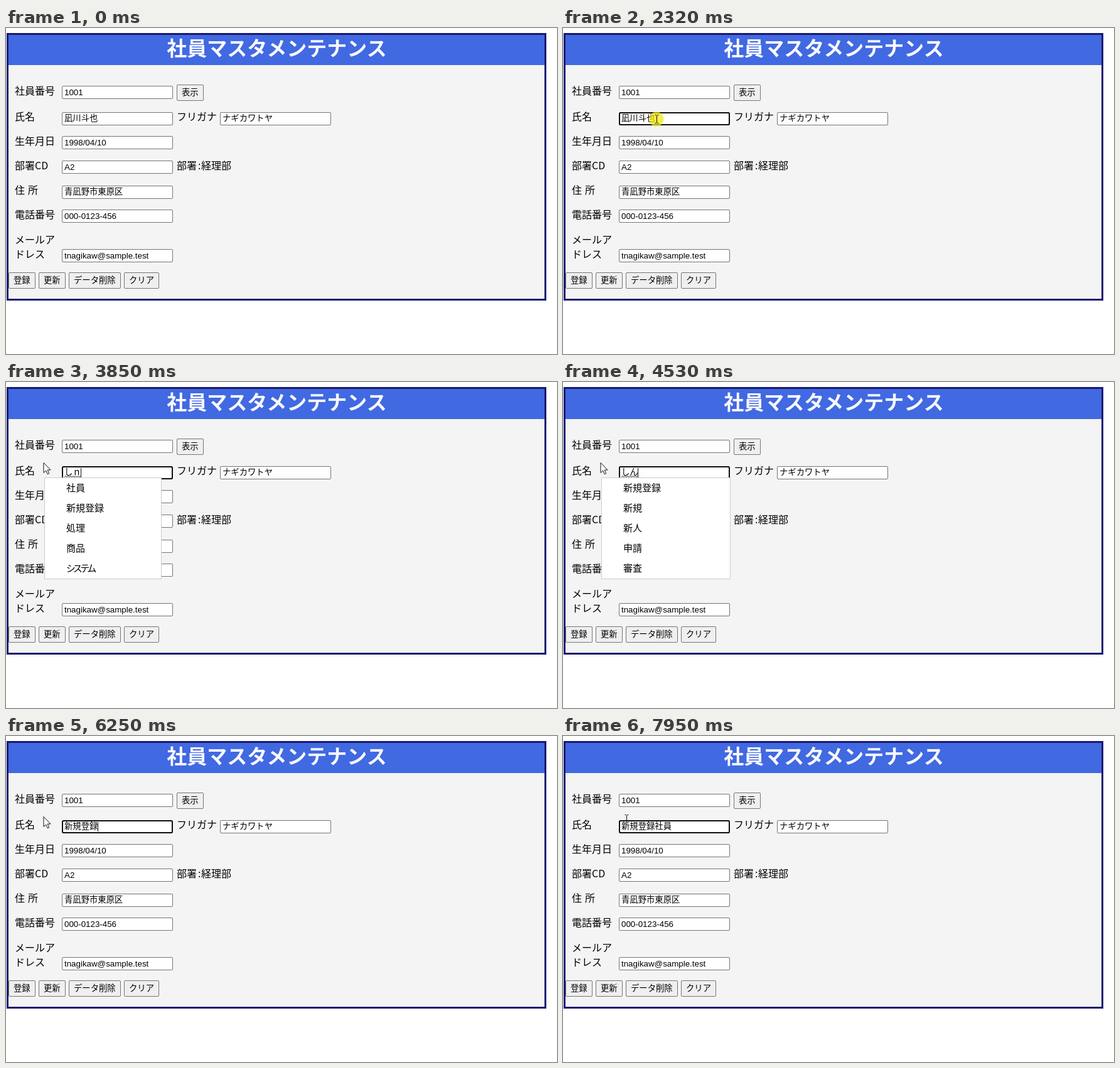
Write an HTML page that moves like this. It is 878 by 519 pixels and loops after 8 s.

```html
<!DOCTYPE html>
<html lang="ja">
<head>
<meta charset="utf-8">
<style>
html, body { margin: 0; width: 100%; height: 100%; overflow: hidden; background: #fff; }
svg { display: block; }
text { font: 16px 'Noto Sans CJK JP', 'Noto Sans CJK', sans-serif; word-spacing: 1.4px; }
.title { font-size: 32px; font-weight: 700; fill: #f8f8ff; text-anchor: middle; }
.field { font: 13.333px 'Liberation Sans', 'Noto Sans CJK JP', 'Noto Sans CJK', sans-serif; }
.button { font-size: 13.333px; }
.candidate { font-size: 15px; }
.kana { font-feature-settings: 'palt'; letter-spacing: -2.3px; }
.index { font: 13px 'Noto Sans', sans-serif; }
</style>
</head>
<body>
<svg id="stage" width="878" height="519" viewBox="0 0 878 519">
  <g id="form"></g>
  <g id="entry"></g>
  <g id="popup"></g>
  <g id="pointer"></g>
</svg>
<script>
const LOOP = 8000, CHAR = 13.333, TEXT_X = 93;
const NAME = '凪川斗也';
const $ = id => document.getElementById(id);

const rect = (x, y, w, h, fill, extra = '') =>
  `<rect x="${x}" y="${y}" width="${w}" height="${h}" fill="${fill}" ${extra}/>`;
const text = (x, y, str, cls = '', fill = '#000') =>
  `<text x="${x}" y="${y}" class="${cls}" ${cls === 'title' ? '' : `fill="${fill}"`}>${str}</text>`;
const line = (d, width = 1, extra = '') =>
  `<path d="${d}" fill="none" stroke="#111" stroke-width="${width}" ${extra}/>`;

// x, top, value, baseline offset
const fields = [
  [89, 92, '1001', 15], [89, 134, '', 14], [341, 134, 'ナギカワトヤ', 14],
  [89, 172, '1998/04/10', 15], [89, 211, 'A2', 15], [89, 251, '青凪野市東原区', 14],
  [89, 289, '000-0123-456', 15], [89, 352, 'tnagikaw@sample.test', 15]
];
const labels = [
  [14, 106, '社員番号'], [14, 147, '氏名'], [272, 147, 'フリガナ'], [14, 186, '生年月日'],
  [14, 225, '部署CD'], [272, 225, '部署'], [306, 225, ':'], [311, 225, '経理部'],
  [14, 264, '住 所'], [14, 303, '電話番号'], [14, 343, 'メールア'], [14, 366, 'ドレス']
];
const buttons = [
  [272, 90, 43, '表示'], [4, 389, 43, '登録'], [52, 389, 43, '更新'],
  [100, 389, 83, 'データ削除'], [188, 389, 56, 'クリア']
];

const box = (x, y, w, h, fill) => rect(x + .5, y + .5, w - 1, h - 1, fill, 'rx="1.5" stroke="#767676"');

$('form').innerHTML =
  rect(2.5, 9.5, 857, 423, '#f4f4f4', 'stroke="#191970" stroke-width="3"') +
  rect(4, 11, 854, 48, '#4169e1') +
  text(431.5, 44, '社員マスタメンテナンス', 'title') +
  labels.map(l => text(...l)).join('') +
  fields.map(([x, y, value, dy]) =>
    box(x, y, 177, 21, '#fff') + text(x + 4, y + dy, value, 'field')).join('') +
  buttons.map(([x, y, w, label]) =>
    box(x, y, w, 26, '#efefef') + text(x + 8, y + 17, label, 'button')).join('');

const lists = {
  shi: ['社員', '新規登録', '処理', '商品', 'システム'],
  shin: ['新規登録', '新規', '新人', '申請', '審査'],
  sha: ['者', '社員', '写真', '社長', 'シャンプー'],
  shain: ['社員', '社員番号', '社員名', '社員証', '社員寮']
};

// time, committed text, composing text, underline, list, popup width, chosen row
const typing = [
  [3580, '', 'ｓ', 'wavy'],
  [3670, '', 'し', 'wavy'],
  [3760, '', 'し', 'wavy', 'shi', 187],
  [3850, '', 'しｎ', 'wavy', 'shi', 187],
  [3980, '', 'しん', 'wavy', 'shi', 187],
  [4120, '', 'しん', 'wavy', 'shin', 206],
  [4660, '', 'しん', 'wavy', 'shi', 187],
  [4860, '', 'し', 'wavy', 'shi', 187],
  [4990, '', 'し', 'wavy', 'shi', 201],
  [5320, '', '社員', 'solid', 'shi', 201, 0],
  [5850, '', '新規登録', 'solid', 'shi', 201, 0],
  [5930, '', '新規登録', 'solid', 'shi', 201, 1],
  [6250, '新規登録', ''],
  [6450, '新規登録', 'ｓ', 'wavy'],
  [6530, '新規登録', 'し', 'wavy'],
  [6600, '新規登録', 'し', 'wavy', 'shi', 187],
  [6670, '新規登録', 'しｙ', 'wavy', 'shi', 187],
  [6720, '新規登録', 'しゃ', 'wavy', 'shi', 187],
  [6790, '新規登録', 'しゃ', 'wavy', 'sha', 187],
  [6860, '新規登録', 'しゃい', 'wavy', 'sha', 187],
  [6930, '新規登録', 'しゃいｎ', 'wavy', 'shain', 194],
  [7000, '新規登録', 'しゃいん', 'wavy', 'shain', 194],
  [7070, '新規登録', '社員', 'solid'],
  [7210, '新規登録社員', '']
];

const path = [
  [400, 515, 314], [800, 28, 39], [1100, 134, 98], [1850, 134, 98], [2180, 158, 145],
  [2280, 158, 145], [2650, 67, 146], [2719, 67, 146], [2720, 59, 128], [7619, 59, 128],
  [7620, 66, 146], [7730, 80, 154], [7840, 94, 138], [7950, 101, 132]
];
// start, end, step of each stretch of pointer movement
const bursts = [[400, 1100, 70], [1850, 2650, 800 / 12], [7620, 7950, 110]];

function snap(t) {
  const burst = bursts.find(([a, b]) => t >= a && t < b);
  return burst ? burst[0] + Math.floor((t - burst[0]) / burst[2] + 1e-6) * burst[2] : t;
}

function pointerAt(t) {
  const i = path.findIndex(k => k[0] > t);
  if (i < 0) return path[path.length - 1].slice(1);
  const [t0, x0, y0] = path[i - 1], [t1, x1, y1] = path[i];
  const p = (t - t0) / (t1 - t0);
  return [x0 + (x1 - x0) * p, y0 + (y1 - y0) * p];
}

const focusRing = y => rect(90, y + 1, 175, 19, '#fff', 'rx="2" stroke="#101010" stroke-width="2"');
const caret = (x, y) => line(`M${Math.floor(x) + .5} ${y + 3}v15`);

function drawSelection(t) {
  const [x] = pointerAt(snap(t));
  const start = Math.max(0, Math.min(4, Math.round((x - TEXT_X) / CHAR)));
  const left = TEXT_X + start * CHAR;
  return rect(left, 136, (4 - start) * CHAR, 17, '#3390ff') +
    text(TEXT_X, 148, NAME.slice(0, start), 'field') +
    text(left, 148, NAME.slice(start), 'field', '#fff');
}

function underline(kind, from, to) {
  if (kind === 'solid') return line(`M${from} 150.5H${to}`);
  let d = `M${from} 151.5`;
  for (let x = from + 2, up = true; x <= to; x += 2, up = !up) d += `L${x} ${up ? 149.5 : 151.5}`;
  return line(d);
}

function drawEntry(t, state) {
  if (t < 1230) return text(TEXT_X, 148, NAME, 'field');
  if (t < 2250) {
    return focusRing(92) + text(TEXT_X, 107, '1001', 'field') + caret(122.6, 92) +
      text(TEXT_X, 148, NAME, 'field');
  }
  if (!state) return focusRing(134) + drawSelection(t);
  const [, done, composing, kind] = state;
  const from = TEXT_X + done.length * CHAR, to = from + composing.length * CHAR;
  return focusRing(134) + text(TEXT_X, 148, done + composing, 'field') +
    (kind ? underline(kind, from, to) : '') +
    (t < 7840 ? caret(to, 134) : '');
}

function drawPopup(state) {
  if (!state || !state[4]) return '';
  const [, done, , , list, width, chosen] = state;
  const x = Math.round(TEXT_X + done.length * CHAR) - 32;
  let out = rect(x + .5, 152.5, width - 1, 161, '#fff', 'stroke="#ccc"');
  if (chosen >= 0) {
    const y = 153 + chosen * 32;
    out += rect(x + 1, y, width - 2, 32, '#9ac9ee') +
      line(`M${x + 141} ${y + 12}l10 10m0 -10l-10 10`, 1.1) +
      line(`M${x + 171.5} ${y + 23.5}l5.2 -5.2`, 1.2) +
      `<circle cx="${x + 180}" cy="${y + 15}" r="4.7" fill="none" stroke="#111" stroke-width="1.1"/>`;
  }
  lists[list].forEach((word, i) => {
    const y = 174 + i * 32;
    out += text(x + 35, y, word, /^[ァ-ー]+$/.test(word) ? 'candidate kana' : 'candidate');
    if (chosen >= 0) out += text(x + 12.5, y, i + 1, 'index');
  });
  return out;
}

function drawPointer(t) {
  if (t < 400) return '';
  const [x, y] = pointerAt(snap(t));
  const dragging = t >= 2250 && t < 2720;
  const pressed = dragging || (t >= 1450 && t < 1580);
  const overField = fields.some(([fx, fy]) => x >= fx && x <= fx + 177 && y >= fy - 3 && y <= fy + 21);
  const shape = dragging || overField
    ? line('M-3 -6.5h2l1 1l1 -1h2M0 -5.5V5.5M-3 6.5h2l1 -1l1 1h2')
    : '<path d="M.5 .5V16.5L4.2 13L6.8 18.8L9.2 17.7L6.7 12H11.6Z" fill="#fff" stroke="#111"/>';
  return (pressed ? `<circle cx="${x}" cy="${y}" r="11.5" fill="#f5e800" opacity=".7"/>` : '') +
    `<g transform="translate(${x + .5} ${y})">${shape}</g>`;
}

function render(t) {
  const state = typing.filter(s => s[0] <= t).pop();
  $('entry').innerHTML = drawEntry(t, state);
  $('popup').innerHTML = drawPopup(state);
  $('pointer').innerHTML = drawPointer(t);
}

const began = performance.now();
function tick() {
  render((performance.now() - began) % LOOP);
  requestAnimationFrame(tick);
}
tick();
</script>
</body>
</html>
```
